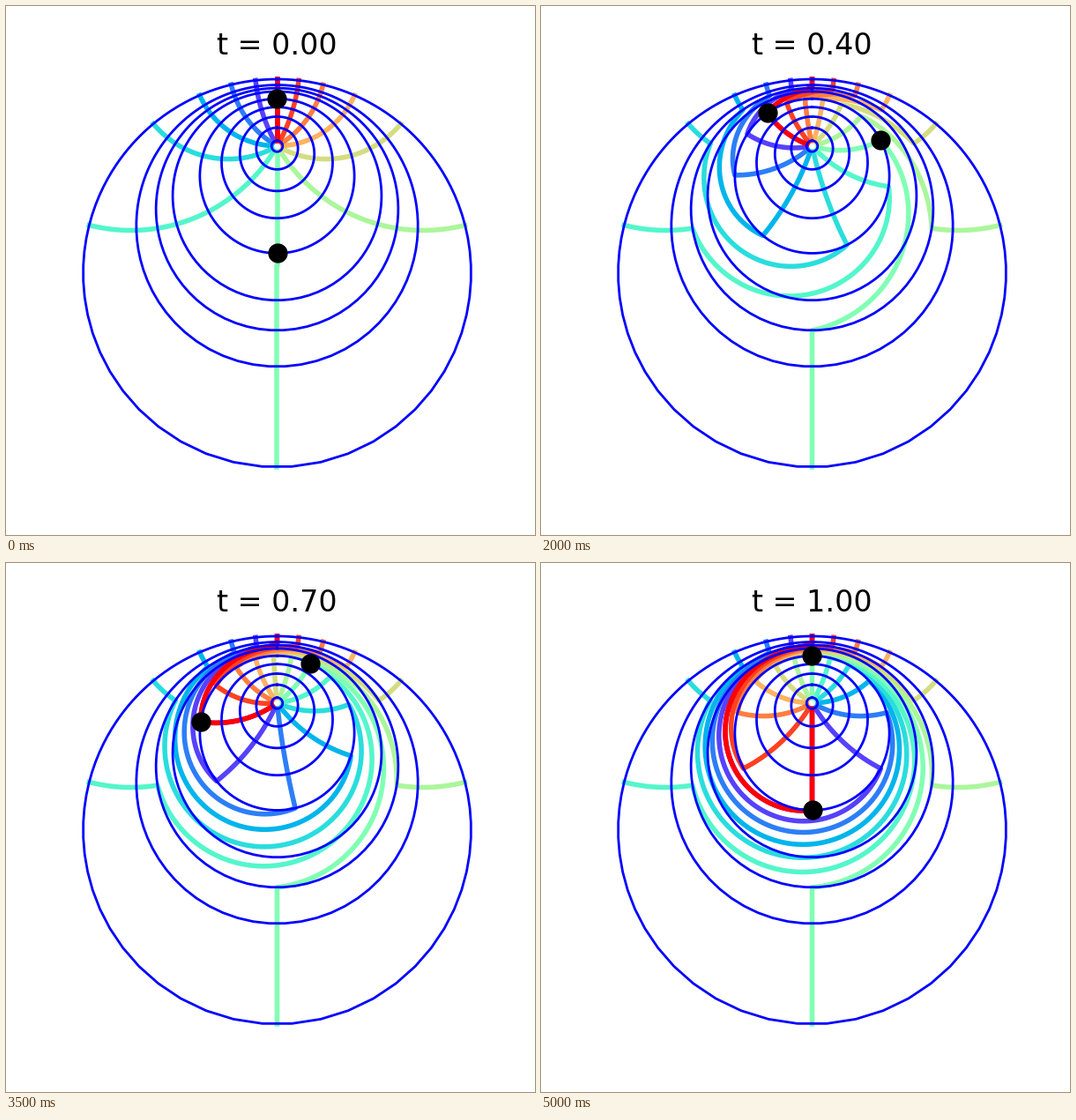
A matplotlib script for the animation above (5100 ms loop, 600x600 px).

```python
import numpy as np
import matplotlib.pyplot as plt
from matplotlib.animation import FuncAnimation

FRAMES = 51
SHIFT = 0.6555                      # image of the disc's centre on the vertical axis
RADII = np.linspace(0.05, 1, 15)
R_IN, R_OUT = RADII[8], RADII[11]   # edges of the twisted annulus
RINGS = np.sort(np.append(RADII[::2], R_OUT))
ANGLES = np.linspace(0, 2 * np.pi, 13)
RHO = np.concatenate([
    np.linspace(RADII[0], R_IN, 80),
    np.linspace(R_IN, R_OUT, 160),
    np.linspace(R_OUT, 1, 60),
])
NUDGE = 1e-7                        # keeps marker pixel rounding stable on the axis


def moebius(z):
    """Map the unit disc to itself, sending 0 to SHIFT on the upward axis."""
    w = 1j * (z + SHIFT) / (1 + SHIFT * z)
    return w.real, w.imag


def twist(rho, t):
    """Rotation angle: half a turn inside, fading to none across the annulus."""
    return np.pi * t * np.interp(rho, [R_IN, R_OUT], [1, 0])


fig = plt.figure(figsize=(6, 6), dpi=100)
ax = fig.add_subplot()
ax.set_aspect("equal")
ax.set_xlim(-1.05, 1.05)
ax.set_ylim(-1.05, 1.05)
ax.axis("off")
title = ax.set_title("t = 0.00", fontsize=24, pad=12)

rays = [
    ax.plot([], [], color=plt.cm.rainbow(k / 12), lw=4)[0]
    for k in range(len(ANGLES))
]
turn = np.exp(1j * np.linspace(0, 2 * np.pi, 200))
for r in RINGS:
    ax.plot(*moebius(r * turn), color="blue", lw=2)
dots, = ax.plot([], [], "o", color="black", ms=15)


def update(i):
    t = i / (FRAMES - 1)
    spin = np.exp(1j * twist(RHO, t))
    for ray, angle in zip(rays, ANGLES):
        ray.set_data(*moebius(RHO * np.exp(1j * angle) * spin))
    ends = R_IN * np.array([1, -1]) * np.exp(1j * (np.pi * t + NUDGE))
    dots.set_data(*moebius(ends))
    title.set_text(f"t = {t:.2f}")
    return [*rays, dots, title]


anim = FuncAnimation(fig, update, frames=FRAMES, interval=100, repeat=True, repeat_delay=0)
plt.show()
```
